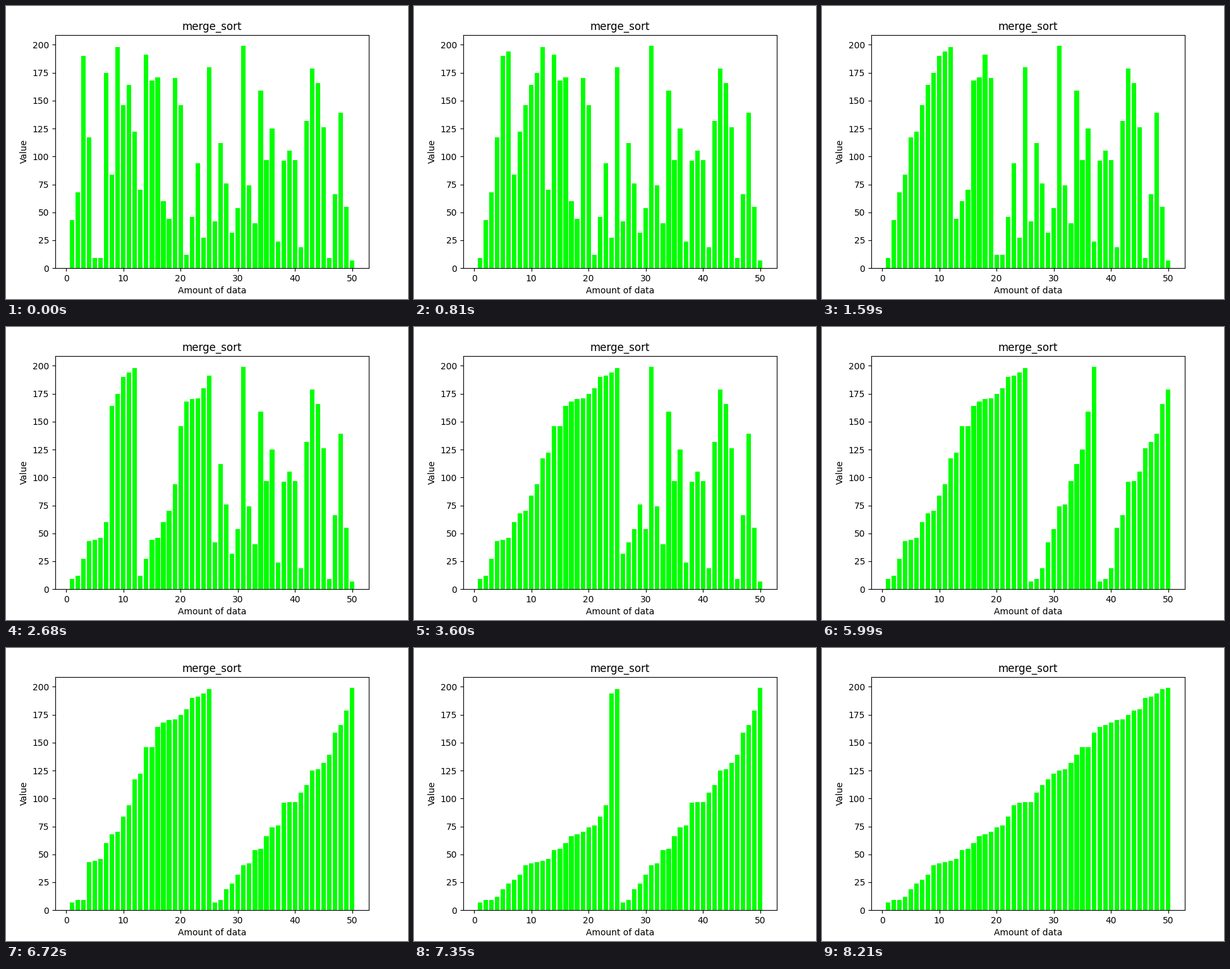
A matplotlib script that plays this animation: 636 by 464 pixels, repeating every 8.25 s.

```python
import matplotlib.pyplot as plt
from matplotlib.animation import FuncAnimation

W, H, DPI = 636, 464, 100
INTERVAL = 30
LOOP = 8250

# The sort is already under way at the start and slows slightly to its end.
FIRST, LAST = 6.6, 285.6
SORT_TIME = 8190
BEND = 0.124

# The unsorted data on show
VALUES = [
    43, 68, 190, 117, 194, 9, 175, 84, 198, 146,
    164, 122, 70, 191, 168, 171, 60, 44, 170, 146,
    12, 46, 94, 27, 180, 42, 112, 76, 32, 54,
    199, 74, 40, 159, 97, 125, 24, 96, 105, 97,
    19, 132, 179, 166, 126, 9, 66, 139, 55, 7,
]


def merge_sort(data, lo, hi):
    """Sort data[lo:hi] in place, yielding a copy after every write."""
    if hi - lo < 2:
        return
    mid = (lo + hi) // 2
    yield from merge_sort(data, lo, mid)
    yield from merge_sort(data, mid, hi)
    left, right = data[lo:mid], data[mid:hi]
    for k in range(lo, hi):
        take_left = left and (not right or left[0] <= right[0])
        data[k] = (left if take_left else right).pop(0)
        yield list(data)


def writes_done(ms):
    """Number of array writes finished at a time in the loop."""
    u = ms / SORT_TIME
    eased = u + BEND * u * u * (1 - u)
    return int(FIRST + (LAST - FIRST) * eased)


states = [list(VALUES)] + list(merge_sort(list(VALUES), 0, len(VALUES)))

# A hair over the pixel size guards against float truncation.
fig = plt.figure(figsize=((W + 1e-4) / DPI, (H + 1e-4) / DPI), dpi=DPI,
                 facecolor="white")
ax = fig.add_axes([78 / W, 48.8 / H, 496 / W, 369.6 / H])
bars = ax.bar(range(1, len(VALUES) + 1), states[0], width=0.8, color="#00ff00")
ax.set_xlim(-1.89, 52.89)
ax.set_ylim(0, 1.05 * max(VALUES))
ax.set_title("merge_sort")
ax.set_xlabel("Amount of data")
ax.set_ylabel("Value")


def update(frame):
    done = min(writes_done(frame * INTERVAL), len(states) - 1)
    for bar, value in zip(bars, states[done]):
        bar.set_height(value)
    return bars.patches


anim = FuncAnimation(fig, update, frames=LOOP // INTERVAL, interval=INTERVAL,
                     repeat=True, repeat_delay=0)
plt.show()
```
